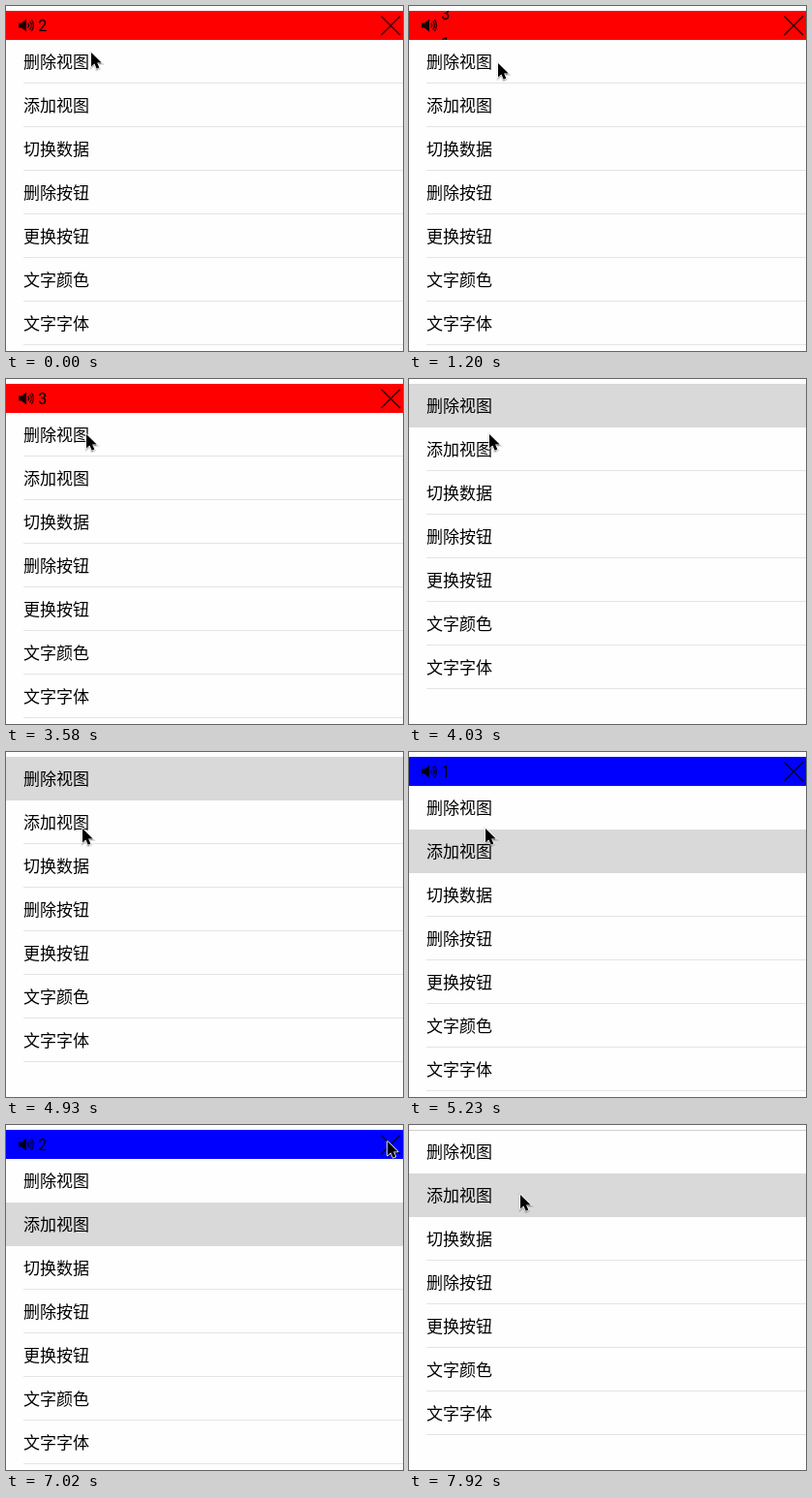
An HTML page for the animation above (8000 ms loop, 410x356 px).

```html
<!DOCTYPE html>
<html lang="zh-CN">
<head>
<meta charset="utf-8">
<title>滚动公告</title>
<style>
html, body { margin: 0; width: 100%; height: 100%; overflow: hidden; background: #fefefe; }
svg { display: block; }
.label { font: 17px "Noto Sans CJK SC", "Noto Sans CJK", sans-serif; }
.digit { font: 16px Roboto, "Liberation Sans", sans-serif; }
</style>
</head>
<body>
<svg width="410" height="356" viewBox="0 0 410 356">
  <defs><clipPath id="barClip"><rect y="5" width="410" height="30"/></clipPath></defs>
  <rect width="410" height="356" fill="#fefefe"/>
  <rect y="5" width="410" height="1" fill="#d0d0d0"/>
  <g id="list"></g>
  <g id="bar" clip-path="url(#barClip)">
    <rect id="barFill" y="5" width="410" height="30"/>
    <path d="M13 17.5h3l5-4v13l-5-4h-3z" fill-opacity=".9"/>
    <path d="M22.7 17.6q1.9 2.4 0 4.8M24.6 15.6q3.5 4.4 0 8.8M26.3 14q4.2 6 0 12" fill="none" stroke="#000" stroke-opacity=".9" stroke-width="1.2"/>
    <text id="leaving" class="digit" x="33.2"></text>
    <text id="arriving" class="digit" x="33.2"></text>
    <path d="M387.5 10.5l19.5 19.5M407 10.5l-19.5 19.5" stroke="#000" stroke-opacity=".8" stroke-width="1.4"/>
  </g>
  <g id="cursor">
    <path d="M0 1v14.5l3.4-3 2.3 5.2 2.6-1.1-2.2-5.1h4.6z" stroke="#000" stroke-opacity=".15" stroke-width="2.6"/>
    <path d="M0 0v14.5l3.4-3 2.3 5.2 2.6-1.1-2.2-5.1h4.6z" stroke="#fff" stroke-width="1.6" stroke-linejoin="round" paint-order="stroke"/>
  </g>
</svg>
<script>
const LOOP = 8000, STEP = 149.4, BAR = 30, ROW = 45, FLIP = 320;
const labels = ['删除视图', '添加视图', '切换数据', '删除按钮', '更换按钮', '文字颜色', '文字字体'];

// Pointer path: step, x, y
const path = [
  [0, 88, 48], [2, 85, 53], [4, 83, 55], [6, 83, 55], [10, 101, 63], [13, 101, 63],
  [16, 93, 57], [21, 83, 57], [28, 83, 57], [31, 80, 84], [33, 79, 79], [36, 79, 79],
  [37, 78, 79], [38, 78, 79], [39, 80, 82], [46, 396, 16], [47, 394, 17], [48, 394, 17],
  [53, 115, 72]
];

// Banner scenes: first step, color (none when closed), selected row, first digit, flip start times
const scenes = [
  { from: 0, color: '#f00', row: -1, digit: 2, flips: [10, 1060, 2110, 3160] },
  { from: 27, row: 0 },
  { from: 35, color: '#00f', row: 1, digit: 1, flips: [6200] },
  { from: 49, row: 1 }
];

const $ = id => document.getElementById(id);
const smooth = p => p * p * (3 - 2 * p);
const clamp = p => Math.min(1, Math.max(0, p));
const move = (el, x, y) => el.setAttribute('transform', `translate(${x} ${y})`);

$('list').innerHTML = labels.map((text, i) => `<g transform="translate(0 ${i * ROW})">
  <rect class="fill" y="5" width="410" height="45" fill="#d9d9d9"/>
  <rect class="line" x="18" y="49" width="392" height="1" fill="#e4e4e6"/>
  <text class="label" x="18" y="34">${text}</text></g>`).join('');
const fills = document.querySelectorAll('.fill');
const lines = document.querySelectorAll('.line');

function pointerAt(step) {
  const i = path.findIndex(key => key[0] >= step);
  if (i < 0) return path[path.length - 1].slice(1);
  if (i === 0) return path[0].slice(1);
  const [s0, x0, y0] = path[i - 1], [s1, x1, y1] = path[i];
  const p = smooth((step - s0) / (s1 - s0));
  return [x0 + (x1 - x0) * p, y0 + (y1 - y0) * p];
}

function showDigit(id, value, y) {
  $(id).textContent = value;
  $(id).setAttribute('y', y);
}

function drawBar({ color, digit, flips }, time) {
  $('bar').style.display = color ? '' : 'none';
  if (!color) return;
  $('barFill').setAttribute('fill', color);
  const count = flips.filter(start => start <= time).length;
  const p = count ? smooth(clamp((time - flips[count - 1]) / FLIP)) : 1;
  const wrap = n => (n + 2) % 3 + 1;
  const y = 25.5 + BAR * (1 - p);
  showDigit('arriving', wrap(digit + count), y);
  showDigit('leaving', wrap(digit + count + 2), y - BAR);
}

function draw(t) {
  const step = Math.floor((t + 12) / STEP);
  const scene = scenes.filter(s => s.from <= step).pop();
  move($('list'), 0, scene.color ? BAR : 0);
  fills.forEach((el, i) => el.style.display = i === scene.row ? '' : 'none');
  lines.forEach((el, i) => el.style.display = i === scene.row || i === scene.row - 1 ? 'none' : '');
  drawBar(scene, step * STEP);
  move($('cursor'), ...pointerAt(step));
}

const start = performance.now();
function tick() {
  draw((performance.now() - start) % LOOP);
  requestAnimationFrame(tick);
}
tick();
</script>
</body>
</html>
```
